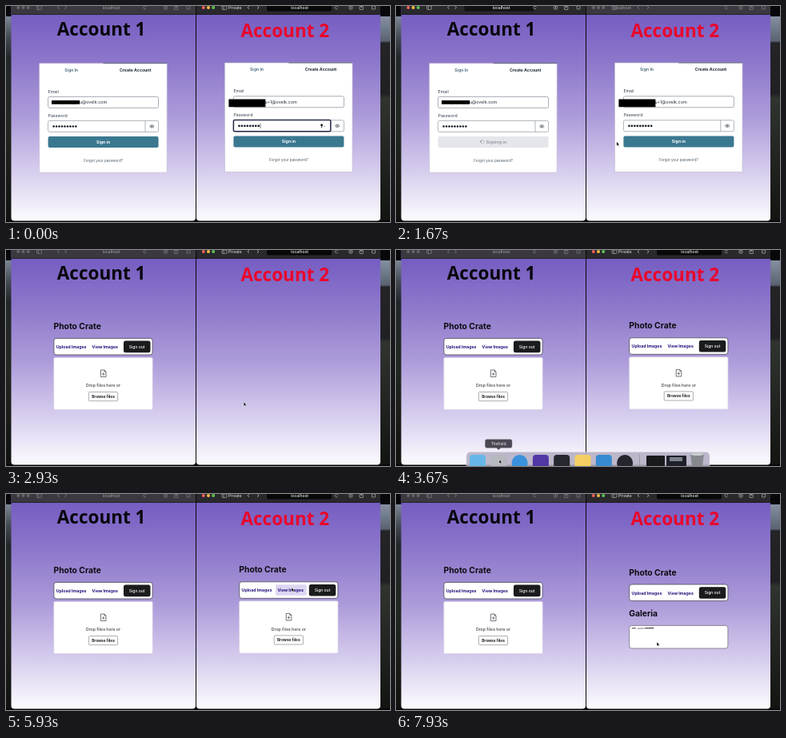
An HTML page with a canvas for the animation above (8 s loop, 480 by 270 pixels).

```html
<!DOCTYPE html>
<html lang="en">
<head>
<meta charset="utf-8">
<title>Two accounts</title>
<style>
html, body { margin: 0; width: 100%; height: 100%; overflow: hidden; background: #08080a; }
canvas { display: block; width: 480px; height: 270px; }
</style>
</head>
<body>
<canvas id="stage"></canvas>
<script>
const W = 480, H = 270, LOOP = 8000, STEP = 1000 / 15;
const canvas = document.getElementById('stage');
const c = canvas.getContext('2d');
const dpr = window.devicePixelRatio || 1;
canvas.width = W * dpr;
canvas.height = H * dpr;

const UI = 'Inter, sans-serif';
const RIGHT_X = 231.8, RIGHT_Y = -0.6;
const APP = 'Photo Crate', TIP = 'Tilefield';

// Cursor stops: time, x, y
const path = [
  [400, 225, 140], [800, 164, 167], [1330, 164, 167], [1870, 328, 171],
  [2130, 328, 174], [2700, 330, 176], [3350, 129, 262], [3950, 129, 262],
  [4550, 339, 114], [5000, 339, 114], [5750, 357, 117], [6500, 357, 117],
  [7300, 326, 185], [8000, 326, 185]
];

const clamp = v => Math.max(0, Math.min(1, v));
const smooth = v => { v = clamp(v); return v * v * (3 - 2 * v); };

function box(x, y, w, h, r, fill, stroke, lw = 0.8) {
  c.beginPath();
  c.roundRect(x, y, w, h, r);
  if (fill) { c.fillStyle = fill; c.fill(); }
  if (stroke) { c.strokeStyle = stroke; c.lineWidth = lw; c.stroke(); }
}

function line(points, color, lw = 0.8) {
  c.beginPath();
  points.forEach(([x, y], i) => i ? c.lineTo(x, y) : c.moveTo(x, y));
  c.strokeStyle = color;
  c.lineWidth = lw;
  c.stroke();
}

function dot(x, y, r, color) {
  c.beginPath();
  c.arc(x, y, r, 0, Math.PI * 2);
  c.fillStyle = color;
  c.fill();
}

function ring(x, y, r, color, lw = 0.7, from = 0, to = Math.PI * 2) {
  c.beginPath();
  c.arc(x, y, r, from, to);
  c.strokeStyle = color;
  c.lineWidth = lw;
  c.stroke();
}

function text(s, x, y, size, color, weight = 400, align = 'left', family = UI) {
  c.font = `${weight} ${size}px ${family}`;
  c.fillStyle = color;
  c.textAlign = align;
  c.textBaseline = 'alphabetic';
  c.fillText(s, x, y);
}

function vertical(y0, y1, stops) {
  const g = c.createLinearGradient(0, y0, 0, y1);
  stops.forEach(([p, color]) => g.addColorStop(p, color));
  return g;
}

function desktop() {
  c.fillStyle = '#08080a';
  c.fillRect(0, 0, W, H);
  c.fillStyle = vertical(13, 268, [[0, '#7c8797'], [0.1, '#454c55'], [0.2, '#22282a'], [0.55, '#222620'], [1, '#101210']]);
  c.fillRect(0, 13, 7, 255);
  c.fillStyle = vertical(13, 268, [[0, '#8590a2'], [0.12, '#596371'], [0.13, '#242427'], [0.38, '#202023'], [0.4, '#30342f'], [1, '#121412']]);
  c.fillRect(467, 13, 13, 255);
}

function pageWindow(x, w) {
  const fill = vertical(11, 268, [[0, '#765dc2'], [0.25, '#8f7acc'], [0.5, '#ad9cda'], [0.75, '#d5cbed'], [1, '#fcfbfe']]);
  box(x, 0, w, 268.5, [0, 0, 4, 4], fill);
}

function toolbar(x, w, active, isPrivate) {
  const ink = active ? '#b5b5b9' : '#85858a';
  c.fillStyle = active ? '#29282c' : '#3b393f';
  c.fillRect(x, 0, w, 11);
  c.fillStyle = '#17161a';
  c.fillRect(x, 10.4, w, 0.6);
  const lights = active ? ['#f4605a', '#f2bd42', '#5bc454'] : ['#66656a', '#66656a', '#66656a'];
  lights.forEach((color, i) => dot(x + 8.8 + i * 6.2, 2, 2, color));
  box(x + 32, 0, 6, 4.4, 1, null, ink, 0.7);
  line([[x + 34, 0], [x + 34, 4.4]], ink, 0.6);
  if (isPrivate) {
    if (active) {
      text('Private', x + 40, 4, 5, '#d4d4d7', 500);
      box(x + 88, -3, 81, 9.5, 2, '#080809');
    }
    text('localhost', active ? x + 129 : x + 45, 4, 5, active ? '#f2f2f2' : '#98979c', 500, 'center');
  } else {
    if (active) box(x + 79, -3, 87, 9.5, 2, '#111113');
    text('localhost', x + 125, 4, 5, active ? '#f2f2f2' : '#98979c', 500, 'center');
  }
  const chev = isPrivate ? [64, 76] : [58, 67];
  line([[x + chev[0] + 2, 0], [x + chev[0], 2], [x + chev[0] + 2, 4]], ink);
  line([[x + chev[1], 0], [x + chev[1] + 2, 2], [x + chev[1], 4]], ink);
  ring(x + (isPrivate ? 175 : 167), 2, 1.8, ink, 0.7, 0.5, 6);
  ring(x + 193, 2, 2.3, ink);
  line([[x + 193, 0], [x + 193, 3.2]], ink);
  box(x + 204, 0.5, 4.4, 4, 0.5, null, ink, 0.7);
  line([[x + 206.2, -1], [x + 206.2, 2.5]], ink);
  box(x + 219.5, 0, 4, 4, 0.5, null, ink, 0.7);
}

function eye(x, y) {
  c.beginPath();
  c.ellipse(x, y, 2.5, 1.6, 0, 0, Math.PI * 2);
  c.strokeStyle = '#555b66';
  c.lineWidth = 0.8;
  c.stroke();
  dot(x, y, 0.9, '#444a55');
}

function signIn(s) {
  box(41.7, 71.7, 159.5, 136.5, 0.5, '#fff', '#c3bcd3', 0.7);
  line([[121.5, 71.6], [201, 71.6]], '#4e5667', 0.8);
  text('Sign In', 81.7, 82, 5.2, '#3f6277', 600, 'center');
  text('Create Account', 161.7, 82, 5.2, '#1d2733', 700, 'center');

  text('Email', 52.6, 108.9, 5.2, '#303b48');
  box(52.6, 113.4, 138, 14, 2, '#fff', '#9198a4');
  text(s.email, s.emailEnd, 122.3, 5.4, '#202a36', 400, 'right');
  box(...s.mask, 0, '#000');

  text('Password', 52.6, 138.7, 5.2, '#303b48');
  box(52.6, 143.4, 138, 14, 2, '#fff', '#9ba2ad');
  line([[174, 143.4], [174, 157.4]], '#9ba2ad');
  if (s.focus) {
    box(52.6, 143.2, 121.4, 14.2, 1.5, '#fff', '#252c49', 1.5);
    dot(162.8, 149.3, 1.5, '#24282e');
    line([[162.8, 150], [162.8, 153]], '#24282e', 0.9);
    line([[165.2, 151.2], [167, 151.2]], '#777', 0.7);
  }
  for (let i = 0; i < s.dots; i++) dot(59.6 + i * 3.47, 150.5, 1.3, '#17202b');
  if (s.focus) line([[58.5 + s.dots * 3.47, 147.3], [58.5 + s.dots * 3.47, 153.7]], '#222', 0.6);
  eye(182.3, 150.4);

  if (s.busy) {
    box(52.6, 163, 138, 14, 2, '#e5e6eb');
    ring(108, 169.7, 2.1, '#b8bdc5', 0.8);
    ring(108, 169.7, 2.1, '#777f8a', 0.8, s.spin, s.spin + 1.6);
    text('Signing in', 125.4, 171.9, 5.4, '#8d949f', 600, 'center');
  } else {
    box(52.6, 163, 138, 14, 2, s.hover ? '#3b5870' : '#3a7890');
    text('Sign in', 121.6, 171.9, 5.2, '#fff', 700, 'center');
  }
  text('Forgot your password?', 121.6, 195, 4.5, '#4c5965', 400, 'center');
}

function navigation(hover) {
  text(APP, 59.5, 99, 10.3, '#0c0b10', 700);
  box(59.9, 110.4, 123.2, 20.6, 3, '#fff', '#4b4855');
  if (hover) box(105.3, 113.8, 38.6, 13.6, 1.5, '#ded6f1');
  text('Upload Images', 62.8, 122.9, 5.2, '#23107c', 700);
  text('View Images', 107.6, 122.9, 5.2, '#23107c', 700);
  box(147, 113.6, 33.5, 14.6, 2.5, '#1b1b1d');
  text('Sign out', 163.7, 122.8, 5, '#fff', 500, 'center');
}

function dropZone() {
  box(59.8, 134.4, 123.4, 65.2, 1.5, '#fff', '#d8d2e4', 0.7);
  line([[123, 150], [118.4, 150], [118.4, 158.6], [125, 158.6], [125, 152], [123, 150], [123, 152], [125, 152]], '#505058', 0.8);
  line([[121.7, 153], [121.7, 157]], '#505058', 0.7);
  line([[119.8, 155], [123.6, 155]], '#505058', 0.7);
  text('Drop files here or', 121.5, 171.2, 5.2, '#55555d', 600, 'center');
  box(103.4, 177.5, 36.2, 11.2, 1, '#fff', '#8c8c94', 0.7);
  text('Browse files', 121.5, 184.9, 4.8, '#202026', 700, 'center');
}

function gallery(loaded) {
  c.save();
  c.translate(0, 3.2);
  navigation(false);
  c.restore();
  text('Galeria', 59.5, 153.7, 10.3, '#0c0b10', 700);
  box(59.9, 165, 123.2, 28.6, 3, '#fff', '#77727f');
  if (loaded) {
    line([[63, 168.5], [68, 168.3]], '#222', 0.9);
    line([[70, 168.7], [78, 168.5]], '#555', 0.8);
    line([[79, 168.4], [90.5, 168.2]], '#222', 1);
  }
}

function dock(rise, tip) {
  c.save();
  c.translate(0, (1 - rise) * 20);
  box(88, 252.5, 304, 30, 5, 'rgba(181,175,196,0.88)', 'rgba(225,222,232,0.7)', 0.6);
  const colors = ['#66b7e8', '#b6b8bf', '#3b92dc', '#5136a5', '#25282e', '#f3cf61', '#378bd0', '#25262d'];
  colors.forEach((color, i) => {
    const x = 102 + i * 26.3;
    if (i === 2 || i === 7) dot(x, 266, 10, color);
    else box(x - 10, 256, 20, 20, 4, color);
  });
  line([[304.5, 256], [304.5, 270]], '#87818f', 0.6);
  box(313, 257, 23, 16, 1, '#191a1d');
  box(338, 257, 25, 16, 1, '#1d2029');
  box(342, 259, 16, 5, 0.5, '#7c828c');
  c.beginPath();
  c.moveTo(368, 255);
  c.lineTo(385, 255);
  c.lineTo(382.5, 275);
  c.lineTo(370.5, 275);
  c.fillStyle = '#85898e';
  c.fill();
  c.beginPath();
  c.ellipse(376.5, 255.3, 8.3, 1.8, 0, 0, Math.PI * 2);
  c.fillStyle = '#c9cdd0';
  c.fill();
  c.restore();
  if (tip) {
    box(111.5, 236.8, 33.5, 10.5, 2, '#4b4853', '#77717f', 0.5);
    c.beginPath();
    c.moveTo(125.5, 247);
    c.lineTo(131, 247);
    c.lineTo(128.2, 250);
    c.fillStyle = '#4b4853';
    c.fill();
    text(TIP, 128.2, 243.9, 5, '#eee', 400, 'center');
  }
}

function position(t) {
  const i = path.findIndex(p => p[0] > t);
  if (i < 1) return path[0].slice(1);
  const a = path[i - 1], b = path[i];
  const k = smooth((t - a[0]) / (b[0] - a[0]));
  return [a[1] + (b[1] - a[1]) * k, a[2] + (b[2] - a[2]) * k];
}

function cursor(t) {
  if (t < 400) return;
  const [x, y] = position(t);
  c.save();
  c.translate(x, y);
  if (t > 780 && t < 1250) {
    box(-1.2, 0, 1.7, 4.5, 0.8, '#fff', '#111', 0.6);
    box(-1.7, 2.5, 4.6, 3.6, 1.3, '#fff', '#111', 0.6);
  } else {
    c.beginPath();
    [[0, 0], [0, 5], [1.2, 4], [2, 5.8], [2.9, 5.4], [2.1, 3.7], [3.6, 3.6]].forEach(([a, b]) => c.lineTo(a, b));
    c.closePath();
    c.fillStyle = '#050505';
    c.fill();
    c.strokeStyle = '#fff';
    c.lineWidth = 0.45;
    c.stroke();
    if (t > 1980 && t < 2520) {
      ring(3.2, 7, 2.1, '#555', 0.7);
      line([[1.8, 5.6], [4.6, 8.4]], '#555', 0.7);
    }
  }
  c.restore();
}

function leftPage(t) {
  if (t < 1730) {
    signIn({
      email: 'agpgelyjoru@ovelk.com', emailEnd: 126.2, mask: [57, 118, 35, 4.8],
      dots: 9, focus: t >= 600 && t < 1250, hover: t >= 750 && t < 1250,
      busy: t >= 1250, spin: t / 110
    });
  } else if (t >= 2730) {
    navigation(false);
    dropZone();
  }
}

function rightPage(t) {
  if (t < 2530) {
    const wide = t >= 1800;
    signIn({
      email: 'ru+1@ovelk.com', emailEnd: 131.8,
      mask: wide ? [44.8, 114, 46, 19.2] : [46.6, 117, 46, 9.8],
      dots: t < 200 ? 8 : 9, focus: t < 600, hover: t >= 1800 && t < 1980,
      busy: t >= 1980, spin: t / 110
    });
  } else if (t >= 3000 && t < 6530) {
    navigation(t >= 4500);
    dropZone();
  } else if (t >= 6530) {
    gallery(t >= 6900);
  }
}

function draw(t) {
  c.setTransform(dpr, 0, 0, dpr, 0, 0);
  desktop();
  pageWindow(6.5, 230.5);
  pageWindow(238, 230);
  const leftActive = t >= 600 && t < 1670;
  toolbar(6.5, 230.5, leftActive, false);
  toolbar(238, 230, !leftActive, true);

  leftPage(t);
  c.save();
  c.translate(RIGHT_X, RIGHT_Y);
  rightPage(t);
  c.restore();

  const title = '"Open Sans", sans-serif';
  text('Account 1', 63.8, 37.3, 22.5, '#08070b', 700, 'left', title);
  text('Account 2', 293.5, 39, 22.5, '#e9072c', 700, 'left', title);

  const rise = smooth((t - 3270) / 270) * (1 - smooth((t - 4070) / 300));
  if (rise > 0) dock(rise, t >= 3530 && t < 4070);
  cursor(t);
}

const start = performance.now();
function frame() {
  const t = (performance.now() - start) % LOOP;
  draw(Math.floor(t / STEP) * STEP);
  requestAnimationFrame(frame);
}
frame();
</script>
</body>
</html>
```
